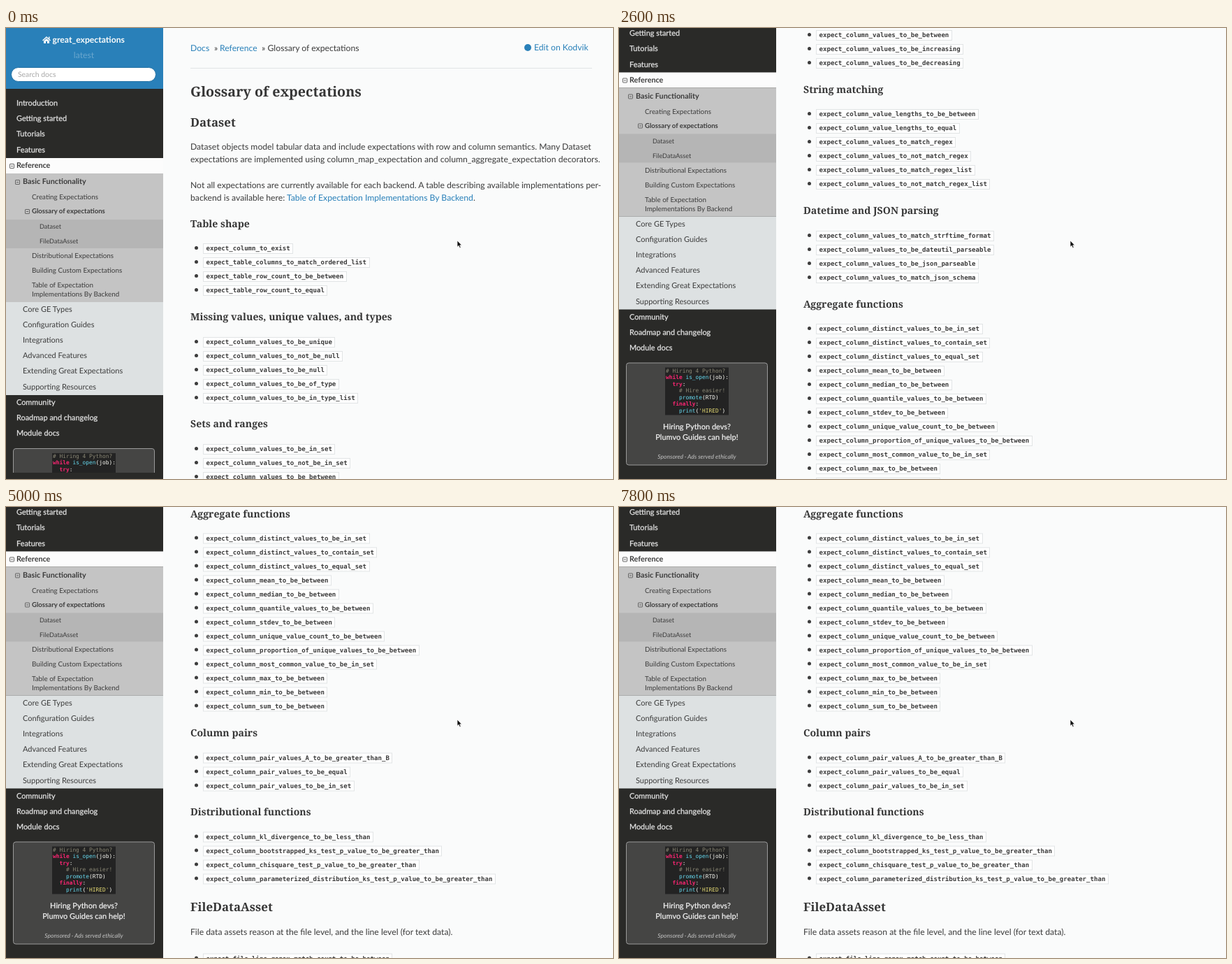
Recreate the animation shown at these times as an HTML page. Size 869 by 645 pixels, loop 8 s.

```html
<!DOCTYPE html>
<html lang="en">
<head>
<meta charset="utf-8">
<title>Glossary of expectations</title>
<style>
  html, body { margin: 0; width: 100%; height: 100%; overflow: hidden; }
  body { position: relative; background: #fafbfb; color: #3c3c3c; text-rendering: geometricPrecision;
    font: 12.2px/20px Lato, sans-serif; }
  div, span, svg { position: absolute; box-sizing: border-box; white-space: pre; }
  span span { position: static; }
  #side { left: 0; top: 0; width: 225px; height: 645px; background: #2a2a28; }
  #clip { left: 0; top: 0; width: 225px; height: 636px; overflow: hidden; }
  #menu, #page { left: 0; top: 0; }
  .center { width: 223px; left: 0 !important; text-align: center; }
  .link { color: #2980b9; }
  .h1, .h2, .h3 { font-family: "Noto Serif", serif; font-weight: 700; color: #363636; }
  .h1 { font-size: 19.7px; }
  .h2 { font-size: 16.9px; }
  .h3 { font-size: 14.1px; }
  .code { height: 15px; padding: 0 3.5px; border: 1px solid #e1e4e5; background: #fff;
    font: bold 9.08px/14px "DejaVu Sans Mono", monospace; }
  .dot { width: 5px; height: 5px; border-radius: 50%; background: #3c3c3c; }
  .title { font-weight: 700; color: #fcfcfc; }
  .version { color: rgba(255, 255, 255, .3); }
  .search { border: 1px solid #2472a4; border-radius: 11px; }
  .hint { font-size: 10.4px; color: #a8a8a8; }
  .top { font-size: 10.9px; color: #e4e4e4; -webkit-text-stroke: .25px; }
  .l1 { font-size: 11px; }
  .l2 { font-size: 9.85px; }
  .l3 { font-size: 9.1px; }
  .bold { font-weight: 700; font-size: 10.8px; }
  .bold2 { font-weight: 700; font-size: 9.6px; }
  .fold { width: 7px; height: 7px; border: 1px solid #666; border-radius: 1px;
    background: linear-gradient(#666, #666) 1px 2px / 3px 1px no-repeat; }
  .ad { border: 1px solid #9a9a9a; border-radius: 4px; background: #454544; }
  .adtext { font-size: 11px; color: #f6f6f6; -webkit-text-stroke: .2px; }
  .note { font-size: 8.5px; font-style: italic; color: #c4c4c4; }
  .snip { font: 7.87px/20px "DejaVu Sans Mono", monospace; color: #f8f8f2; }
  .snip b { color: #f92672; }
  .snip i { color: #8a8775; font-style: normal; }
  .snip u { color: #66d9ef; text-decoration: none; }
  .snip s { color: #e6db74; text-decoration: none; }
  .button { background: #eee; border: 1px solid #dcdcdc; }
</style>
</head>
<body>
<div id="page"></div>
<div id="side"><div id="clip"><div id="menu"></div></div></div>
<svg style="left:644px;top:302px" width="10" height="15" viewBox="0 0 10 15">
  <path d="M2 2V11.2L4.1 9.3L5.6 12.6L7.2 11.9L5.8 8.7H8.5Z" fill="#111" stroke="#fff" stroke-width=".7"/>
</svg>
<script>
const page = document.getElementById('page');
const menu = document.getElementById('menu');

function add(parent, tag, x, y, cls, html = '') {
  const node = document.createElement(tag);
  node.className = cls;
  node.style.left = x + 'px';
  node.style.top = y + 'px';
  node.innerHTML = html;
  parent.append(node);
  return node;
}
// Text is placed by its left edge and vertical centre.
const text = (parent, x, y, html, cls = '') => add(parent, 'span', x, y - 10, cls, html);

function box(parent, x, y, w, h, fill, cls = '') {
  const node = add(parent, 'div', x, y, cls);
  node.style.width = w + 'px';
  node.style.height = h + 'px';
  if (fill) node.style.background = fill;
}

function icon(parent, x, y, shapes) {
  const svg = `<svg width="12" height="12" viewBox="-6 -6 12 12">${shapes}</svg>`;
  add(parent, 'div', x - 6, y - 6, '', svg);
}

function list(y, names) {
  names.split(' ').forEach((name, i) => {
    const rowY = y + i * 20;
    add(page, 'div', 269.5, rowY - 3, 'dot');
    add(page, 'div', 282, rowY - 7, 'code', 'expect_' + name);
  });
}

function buildPage() {
  text(page, 264, 28.5, 'Docs', 'link');
  text(page, 298, 28.5, '»');
  text(page, 306, 28.5, 'Reference', 'link');
  text(page, 366, 28.5, '»');
  text(page, 374.5, 28.5, 'Glossary of expectations');
  icon(page, 747, 28, '<circle r="5" fill="#2980b9"/>');
  text(page, 756, 28, 'Edit on Kodvik', 'link');
  box(page, 264, 57, 575, 1, '#e1e4e5');

  text(page, 264, 91, 'Glossary of expectations', 'h1');
  text(page, 264, 134.5, 'Dataset', 'h2');
  text(page, 264, 170, 'Dataset objects model tabular data and include expectations with row and column semantics. Many Dataset');
  text(page, 264, 188, 'expectations are implemented using column_map_expectation and column_aggregate_expectation decorators.');
  text(page, 264, 225, 'Not all expectations are currently available for each backend. A table describing available implementations per-');
  text(page, 264, 243, 'backend is available here: <span class="link">Table of Expectation Implementations By Backend</span>.');

  const sections = {
    'Table shape': 'column_to_exist table_columns_to_match_ordered_list table_row_count_to_be_between table_row_count_to_equal',
    'Missing values, unique values, and types': 'column_values_to_be_unique column_values_to_not_be_null column_values_to_be_null column_values_to_be_of_type column_values_to_be_in_type_list',
    'Sets and ranges': 'column_values_to_be_in_set column_values_to_not_be_in_set column_values_to_be_between column_values_to_be_increasing column_values_to_be_decreasing',
    'String matching': 'column_value_lengths_to_be_between column_value_lengths_to_equal column_values_to_match_regex column_values_to_not_match_regex column_values_to_match_regex_list column_values_to_not_match_regex_list',
    'Datetime and JSON parsing': 'column_values_to_match_strftime_format column_values_to_be_dateutil_parseable column_values_to_be_json_parseable column_values_to_match_json_schema',
    'Aggregate functions': 'column_distinct_values_to_be_in_set column_distinct_values_to_contain_set column_distinct_values_to_equal_set column_mean_to_be_between column_median_to_be_between column_quantile_values_to_be_between column_stdev_to_be_between column_unique_value_count_to_be_between column_proportion_of_unique_values_to_be_between column_most_common_value_to_be_in_set column_max_to_be_between column_min_to_be_between column_sum_to_be_between',
    'Column pairs': 'column_pair_values_A_to_be_greater_than_B column_pair_values_to_be_equal column_pair_values_to_be_in_set',
    'Distributional functions': 'column_kl_divergence_to_be_less_than column_bootstrapped_ks_test_p_value_to_be_greater_than column_chisquare_test_p_value_to_be_greater_than column_parameterized_distribution_ks_test_p_value_to_be_greater_than'
  };
  let y = 280.6;
  for (const [heading, names] of Object.entries(sections)) {
    text(page, 264, y, heading, 'h3');
    list(y + 34.6, names);
    y += 53.4 + 20 * names.split(' ').length;
  }

  text(page, 264, 1589, 'FileDataAsset', 'h2');
  text(page, 264, 1625, 'File data assets reason at the file level, and the line level (for text data).');
  list(1662.5, 'file_line_regex_match_count_to_be_between file_line_regex_match_count_to_equal file_hash_to_equal file_size_to_be_between file_to_exist file_to_have_valid_table_header file_to_be_valid_json');

  const arrow = flip => `<g transform="scale(${flip} 1)"><circle r="5" fill="#404040"/>
    <path d="M3 0H-2M.2-2.6L-2.4 0L.2 2.6" fill="none" stroke="#eee" stroke-width="1.5"/></g>`;
  box(page, 264, 1810, 79, 26, '', 'button');
  icon(page, 279, 1823, arrow(1));
  text(page, 286.5, 1823, 'Previous');
  box(page, 780, 1810, 59, 26, '', 'button');
  text(page, 789.5, 1823, 'Next');
  icon(page, 824, 1823, arrow(-1));
  box(page, 264, 1854, 575, 1, '#e1e4e5');
}

function buildMenu() {
  box(menu, 0, 0, 225, 87, '#2980b9');
  icon(menu, 58, 17, '<path d="M-6 .5L0-5L6 .5L5 1.5L0-3L-5 1.5ZM-4 1.5L0-2L4 1.5V5H1V2H-1V5H-4ZM3-4.5H4.5V-1L3-2.4Z" fill="#fcfcfc"/>');
  text(menu, 66.5, 17, 'great_expectations', 'title');
  text(menu, 0, 38.5, 'latest', 'version center');
  box(menu, 7, 56, 208, 21, '#fff', 'search');
  text(menu, 17, 67, 'Search docs', 'hint');

  box(menu, 0, 185.5, 225, 22.5, '#fcfcfc');
  box(menu, 0, 208, 225, 183.5, '#c4c4c4');
  box(menu, 0, 273.5, 225, 41, '#b5b5b5');
  box(menu, 0, 391.5, 225, 133, '#dde1e2');

  const column = (x, y, step, cls, names) =>
    names.forEach((name, i) => text(menu, x, y + i * step, name, cls));
  column(15, 108, 22.2, 'top', ['Introduction', 'Getting started', 'Tutorials', 'Features']);
  text(menu, 15, 197, 'Reference', 'bold');
  text(menu, 24, 220, 'Basic Functionality', 'bold');
  text(menu, 37, 242, 'Creating Expectations', 'l2');
  text(menu, 37, 263.3, 'Glossary of expectations', 'bold2');
  column(48, 284, 20.5, 'l3', ['Dataset', 'FileDataAsset']);
  column(37, 325.5, 21.2, 'l2', ['Distributional Expectations', 'Building Custom Expectations']);
  column(37, 368, 13.3, 'l2', ['Table of Expectation', 'Implementations By Backend']);
  column(24, 403, 22.1, 'l1', ['Core GE Types', 'Configuration Guides', 'Integrations',
    'Advanced Features', 'Extending Great Expectations', 'Supporting Resources']);
  column(15, 535.7, 22.1, 'top', ['Community', 'Roadmap and changelog', 'Module docs']);
  for (const [x, y] of [[8, 197], [16.5, 220], [30.5, 262.5]]) add(menu, 'div', x - 3.5, y - 3.5, 'fold');

  box(menu, 9.5, 601, 203.5, 147, '', 'ad');
  box(menu, 66, 607.5, 91, 68.5, '#232323');
  column(67, 612.6, 9.5, 'snip', [
    '<i># Hiring 4 Python?</i>',
    '<b>while</b> <u>is_open</u>(job):',
    '  <b>try</b>:',
    '    <i># Hire easier!</i>',
    '    <u>promote</u>(RTD)',
    '  <b>finally</b>:',
    "    <u>print</u>(<s>'HIRED'</s>)"
  ]);
  text(menu, 0, 693, 'Hiring Python devs?', 'adtext center');
  text(menu, 0, 708.4, 'Plumvo Guides can help!', 'adtext center');
  text(menu, 0, 735, 'Sponsored · Ads served ethically', 'note center');
}

const LOOP = 8000, STEP = 200, MENU_LIMIT = 122.5;
// [time in ms, scroll offset in px]
const scrollKeys = [[0, 0], [800, 260.5], [2600, 632], [3600, 679], [5000, 1017.5],
  [6000, 1155], [6200, 1220], [6600, 1220], [7800, 1017.5]];

function scrollAt(time) {
  const next = scrollKeys.findIndex(key => key[0] >= time);
  if (next <= 0) return 0;
  const [t0, y0] = scrollKeys[next - 1], [t1, y1] = scrollKeys[next];
  return y0 + (y1 - y0) * (time - t0) / (t1 - t0);
}

const start = performance.now();
function render() {
  const time = Math.max(0, performance.now() - start) % LOOP;
  const scroll = scrollAt(Math.floor(time / STEP) * STEP);
  page.style.transform = `translateY(${-scroll}px)`;
  menu.style.transform = `translateY(${-Math.min(scroll, MENU_LIMIT)}px)`;
  requestAnimationFrame(render);
}

buildPage();
buildMenu();
render();
</script>
</body>
</html>
```
